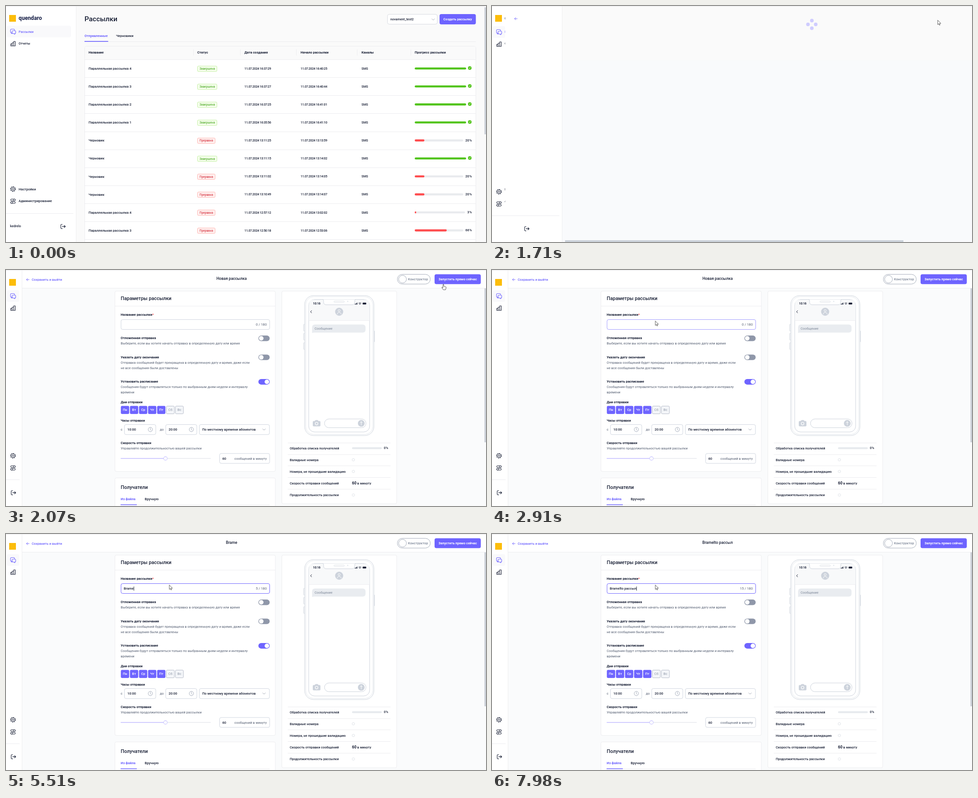
These frames come from a looping animation (1064 by 526 pixels, 8000 ms). An HTML page:

```html
<!DOCTYPE html>
<html lang="ru">
<head>
<meta charset="utf-8">
<style>
html, body { margin: 0; width: 100%; height: 100%; overflow: hidden; background: #fafafa; }
svg { display: block; font-family: Roboto, "Noto Sans", sans-serif; }
text { white-space: pre; }
.num { letter-spacing: -.33px; }
</style>
</head>
<body>
<svg id="stage" width="1064" height="526" viewBox="0 0 1064 526"></svg>
<script>
const INK = '#161d33', GRAY = '#525c70', PALE = '#cdd3dc', LINE = '#ececef', VIOLET = '#6e64ff';
const GREEN = '#52c41a', RED = '#ff4d4f';
const LOOP = 8000;

// Shape helpers; text is placed by its vertical centre.
const text = (x, y, s, { size = 7.5, w = 500, fill = INK, at = 'start', extra = '' } = {}) =>
  `<text x="${x}" y="${y + size * .36}" font-size="${size}" font-weight="${w}" fill="${fill}" text-anchor="${at}" ${extra}>${s}</text>`;
const rect = (x, y, x2, y2, fill, r = 0, stroke = 'none', extra = '') =>
  `<rect x="${x}" y="${y}" width="${x2 - x}" height="${y2 - y}" rx="${r}" fill="${fill}" stroke="${stroke}" ${extra}/>`;
const circle = (x, y, r, fill, stroke = 'none', extra = '') =>
  `<circle cx="${x}" cy="${y}" r="${r}" fill="${fill}" stroke="${stroke}" ${extra}/>`;
const path = (d, stroke, w = 1, fill = 'none', extra = '') =>
  `<path d="${d}" stroke="${stroke}" stroke-width="${w}" fill="${fill}" stroke-linecap="round" stroke-linejoin="round" ${extra}/>`;
const hline = (x, x2, y, color = LINE) => path(`M${x} ${y}H${x2}`, color);
const group = (id, body, extra = '') => `<g id="${id}" ${extra}>${body}</g>`;
const chevron = (x, y) => path(`M${x - 3} ${y - 1.5}l3 3 3-3`, '#9aa1ae', .9);
const backArrow = (x, y) => path(`M${x + 6} ${y}H${x}m2.8-2.8L${x} ${y}l2.8 2.8`, VIOLET, .9);
const bold = { w: 700, size: 7.4 };
const soft = { w: 400, size: 7.4, fill: GRAY };

// Mailing list page
const P = 'Параллельная рассылка ', D = 'Черновик';
const rows = [
  [P + 4, '16:37:29', '16:40:25', 100], [P + 3, '16:37:27', '16:40:44', 100],
  [P + 2, '16:37:25', '16:41:01', 100], [P + 1, '16:35:56', '16:41:10', 100],
  [D, '13:11:25', '13:13:59', 20], [D, '13:11:15', '13:14:02', 100],
  [D, '13:11:02', '13:14:05', 20], [D, '13:10:49', '13:14:07', 20],
  [P + 4, '12:57:12', '13:02:02', 3], [P + 3, '12:50:18', '12:53:06', 66]
];

function progress(y, pct) {
  if (pct === 100)
    return rect(906, y - 2.3, 1020, y + 2.3, GREEN, 2.3) + circle(1028, y - 1, 4, GREEN) +
      path(`M1026.3 ${y - 1}l1.2 1.3 2.1-2.5`, '#fff', .9);
  const end = pct < 10 ? 1017.5 : 1013.5;
  return rect(906, y - 2.3, end, y + 2.3, '#e9ebee', 2.3) +
    rect(906, y - 2.3, 906 + (end - 906) * pct / 100, y + 2.3, RED, 2.3) +
    text(1032.5, y - .5, pct + '%', { size: 7.6, at: 'end' });
}

function tableRow([name, made, start, pct], i) {
  const y = 139.2 + 40.1 * i, done = pct === 100;
  const [edge, bg, ink] = done ? ['#b7eb8f', '#f6ffed', '#389e0d'] : ['#ffa39e', '#fff1f0', '#cf1322'];
  const date = { size: 7, extra: 'class="num"' };
  return text(183, y, name, { size: 7.6 }) +
    rect(424.5, y - 5.3, done ? 467.5 : 463.5, y + 6.7, bg, 2, edge, 'stroke-width=".8"') +
    text(429, y + .5, done ? 'Завершена' : 'Прервана', { size: 6.5, fill: ink, w: 400 }) +
    text(528.5, y, '11.07.2024 ' + made, date) + text(653, y, '11.07.2024 ' + start, date) +
    text(788, y, 'SMS', { size: 7 }) + progress(y, pct) + hline(174, 1041, Math.round(y + 20) + .5);
}

const heads = [[183, 'Название'], [424, 'Статус'], [528.5, 'Дата создания'], [653, 'Начало рассылки'],
  [788, 'Каналы'], [906, 'Прогресс рассылки']];
const list = rect(155, 0, 1064, 526, '#fafafa') +
  text(174, 28.5, 'Рассылки', { size: 15.4 }) +
  rect(845.5, 18.5, 956, 40.5, '#fff', 4, '#d7dae0') + text(852, 29, 'novament_test2', { size: 7.2 }) + chevron(947, 30) +
  rect(961, 18, 1041.5, 41, VIOLET, 4, 'none', 'id="create"') +
  text(1001.3, 29, 'Создать рассылку', { size: 7.2, w: 700, fill: '#fff', at: 'middle' }) +
  text(174, 66.3, 'Отправленные', { size: 7.3, w: 700, fill: VIOLET }) + text(244, 66.3, 'Черновики', { size: 7.4 }) +
  hline(174, 1041, 79.5) + rect(174, 78, 226.5, 79.7, VIOLET) +
  rect(174.5, 89.5, 1041.5, 540, '#fff', 4, LINE) + rect(175, 90, 1041, 119, '#fafafa', 3) + hline(174, 1041, 119.5) +
  heads.map(([x, s]) => text(x, 103.3, s, bold)).join('') +
  [415, 519, 643, 778, 897].map(x => path(`M${x}.5 97V110`, LINE)).join('') +
  rows.map(tableRow).join('') + rect(1060.5, 3, 1064, 286, '#cbd0d7');

// Loading page
const load = rect(30, 0, 1064, 526, '#fafafa') + rect(155, 121, 1064, 526, '#f9fafc') +
  rect(162, 522, 912, 526, '#cbd2da') +
  group('spin', [0, 90, 180, 270].map(a => circle(0, -8.6, 4, '#cfccff', 'none', `transform="rotate(${a})"`)).join(''));

// Mailing form page
const toggle = (y, on) => rect(559.5, y - 6.2, 584.5, y + 6.2, on ? VIOLET : '#8f97a9', 6.2) +
  circle(on ? 578.3 : 565.8, y, 5, '#fff');
const box = (x, y, x2, y2, extra = '') => rect(x, y, x2, y2, '#fff', 3.5, '#cfd5df', extra);
const clock = x => circle(x, 355.5, 4.8, 'none', '#9aa3b3', 'stroke-width=".9"') + path(`M${x} 352.5v3l2 1.6`, '#9aa3b3', .9);
const day = (s, i) => {
  const x = 255 + i * 20.1, off = i > 4;
  return rect(x, 303.3, x + 17.6, 320.5, off ? '#f4f6f9' : VIOLET, 2, off ? '#a5adbb' : VIOLET, 'stroke-width=".8"') +
    text(x + 8.8, 311.5, s, { size: 7.6, w: off ? 400 : 500, fill: off ? '#8b94a5' : '#fff', at: 'middle' });
};
const labels = [[99, 'Название рассылки<tspan fill="#ff4d4f">*</tspan>'], [151.5, 'Отложенная отправка'],
  [194, 'Указать дату окончания'], [248.5, 'Установить расписание'], [294, 'Дни отправки'],
  [335, 'Часы отправки'], [385, 'Скорость отправки']];
const notes = [[163.7, 'Выберите, если вы хотите начать отправку в определенную дату или время'],
  [206, 'Отправка сообщений будет прекращена в определенную дату и время, даже если'],
  [218, 'не все сообщения были доставлены'],
  [260.5, 'Сообщения будут отправляться только по выбранным дням недели и интервалу'],
  [272.5, 'времени'], [397.5, 'Управляйте продолжительностью вашей рассылки']];
const params = rect(241.5, 47, 597, 449, '#fff', 3, LINE) + hline(242, 597, 80.5) +
  text(254.3, 63, 'Параметры рассылки', { size: 10.8 }) +
  labels.map(([y, s]) => text(254.3, y, s, bold)).join('') +
  notes.map(([y, s]) => text(254.3, y, s, soft)).join('') +
  box(255, 110.5, 584.5, 132.5, 'id="field"') + text(261, 121, '', { extra: 'id="typed"' }) +
  text(578, 121, '', { ...soft, size: 7.7, at: 'end', extra: 'id="count"' }) + rect(0, 117, .9, 126.3, INK, 0, 'none', 'id="caret"') +
  toggle(152.3, 0) + toggle(194.6, 0) + toggle(249.2, 1) +
  ['Пн', 'Вт', 'Ср', 'Чт', 'Пт', 'Сб', 'Вс'].map(day).join('') +
  text(254.3, 355, 'с', soft) + box(262.5, 344.5, 332, 366.8) + text(269, 355, '10:00') + clock(320) +
  text(341, 355, 'до', soft) + box(354, 344.5, 423, 366.8) + text(360.5, 355, '20:00') + clock(411) +
  box(428.5, 344.5, 584, 366.8) + text(435, 355, 'По местному времени абонентов') + chevron(572, 355.5) +
  rect(254, 419, 353, 421, '#d0ccff', 1) + rect(353, 419, 454, 421, '#eceef2', 1) + circle(353.5, 420, 4, '#fff', '#d0ccff', 'stroke-width="1.3"') +
  box(473.5, 409, 584.5, 431) + text(479.5, 420, '60') + text(578, 420, 'сообщений в минуту', { ...soft, at: 'end' });
const receivers = rect(241.5, 463.5, 597, 540, '#fff', 3, LINE) + text(254.3, 484, 'Получатели', { size: 10.8 }) +
  text(254.3, 510.5, 'Из файла', { ...bold, fill: VIOLET }) + text(307.5, 510.5, 'Вручную') +
  hline(254, 584, 523.5) + rect(254, 522.5, 290, 524, VIOLET);

const phone = [[121, 136], [141, 156], [162, 177]].map(([a, b]) => rect(660, a, 663, b, '#fff', 1, PALE)).join('') +
  rect(814, 136, 817, 160, '#fff', 1, PALE) +
  rect(662, 57, 815.5, 369, '#fff', 20, PALE) + rect(664.5, 59.5, 813, 366.5, '#fff', 18, '#e2e6eb') +
  rect(671, 65.5, 806, 361, '#fff', 13, PALE) +
  path('M671.5 112.5V78q0-12 12-12H794q11.500 0 11.500 12v34.500z', 'none', 0, '#f8f9fa') + hline(671, 806, 112.5) +
  path('M702 65.500q2 0 2 3v3q0 6 6 6h57q6 0 6-6v-3q0-3 2-3', PALE, 1, '#fff') +
  rect(727, 69, 750, 72, '#fff', 1.5, '#dde1e7') + circle(757.5, 70, 1.4, '#e4e8ed') +
  text(680.5, 74.2, '10:16', { size: 6.4, w: 700 }) +
  [0, 1, 2, 3].map(i => rect(773 + i * 1.6, 75.7 - i, 774.1 + i * 1.6, 77, INK)).join('') +
  path('M781.800 73.800q2.700-2 5.400 0M783 75.500q1.500-1 3 0', INK, .9) + circle(784.5, 76.7, .6, INK) +
  rect(790.5, 72.7, 798.5, 76.7, INK, 1.3) +
  path('M677.500 90.500l-2.500 2.600 2.500 2.600', INK, 1) +
  circle(738.5, 93, 9, PALE) + circle(738.5, 90.5, 2.3, 'none', '#fff') + path('M734 98.500q.5-4 4.500-4t4.500 4', '#fff') +
  path('M678.500 140.500V128q0-6.500 6.500-6.500h105.500q6.500 0 6.500 6.500v5q0 6.500-6.500 6.500H682z', 'none', 0, '#e9ecf0') +
  text(684, 130.3, 'Сообщение', { ...soft, fill: '#7d8798' }) +
  rect(680, 336.5, 697, 348.5, PALE, 2.5) + rect(685, 334.5, 692, 339, PALE, 1.5) + circle(688.5, 342.3, 3, PALE, '#fff', 'stroke-width="1.2"') +
  rect(706, 332, 798, 351.5, '#fff', 9.8, PALE) + circle(787.5, 341.8, 7.5, PALE) +
  path('M787.500 345.500v-7.500m-2.500 2.500l2.500-2.500 2.500 2.500', '#fff');
const stats = ['Обработка списка получателей', 'Валидные номера', 'Номера, не прошедшие валидацию',
  'Скорость отправки сообщений', 'Продолжительность рассылки'].map((s, i) =>
  hline(625, 852, Math.round(384.7 + 25.8 * i) + .5) + text(629, 397 + 26 * i, s, { size: 7.4 })).join('') +
  rect(767, 395, 833, 399.3, '#e7eaee', 2.1) + text(837.5, 396.7, '0%', { size: 7.4 }) +
  [423, 449, 501.5].map(y => circle(770, y, 2.8, 'none', '#dfe3e8')).join('') +
  text(767, 475, '<tspan font-size="8.5" font-weight="700">60</tspan> в минуту', { size: 7.4 });
const form = rect(30, 0, 1064, 526, '#fafbfc') + rect(30, 0, 1064, 40.5, '#fff') + hline(36, 1064, 40.5) +
  backArrow(45.3, 21.4) + text(57, 21, 'Сохранить и выйти', { size: 7.4, fill: VIOLET }) +
  text(500, 19, '', { size: 8.6, at: 'middle', extra: 'id="title"' }) +
  rect(867.5, 9.7, 940.5, 31.3, '#fff', 10.8, '#a3abb9') + circle(879, 20.5, 8.6, '#fff', '#a3abb9') +
  text(891, 20.3, 'Конструктор', { size: 7.4, fill: '#7b8597' }) +
  rect(950, 9.5, 1052.5, 31.5, VIOLET, 4) + text(1001.3, 20, 'Запустить прямо сейчас', { size: 7.3, w: 700, fill: '#fff', at: 'middle' }) +
  params + receivers + rect(611.5, 47, 866, 521, '#fff', 3, LINE) + phone + stats + rect(1060.5, 41, 1064, 384, '#cbd0d7');

// Sidebar
const chat = path('M12 59.500q-2 0-2-2v-4q0-2 2-2h5q2 0 2 2v1.500M12 59.500v2.200l2-2M15.500 55h4q2 0 2 2v2.500q0 2-2 2v1.700l-2-1.700h-2q-2 0-2-2V57q0-2 2-2z', VIOLET, 1.1);
const chart = path('M10.500 89v-4.500h3V89zM13.500 89v-7h3.500v7zM17 89V79h3.500v10z', INK, 1.1);
const gear = circle(15.5, 408, 4.3, 'none', INK) + circle(15.5, 408, 1.7, 'none', INK) +
  circle(15.5, 408, 5.3, 'none', INK, 'stroke-width="1.4" stroke-dasharray="2 2.16"');
const sliders = rect(10.2, 430.3, 20.8, 434, 'none', 1.9, INK) + rect(10.2, 436.3, 20.8, 440, 'none', 1.9, INK) +
  circle(18.7, 432.2, 2.1, '#fff', INK) + circle(12.3, 438.1, 2.1, '#fff', INK);
const side = rect(0, 0, 155, 526, '#fff', 0, 'none', 'id="panel"') + path('M0 0V526', '#eeeef0', 1, 'none', 'id="edge"') +
  rect(7, 20, 22, 35, '#fcbd0b') +
  group('upper', rect(2, 44, 144, 70, '#f9f9fb', 4, 'none', 'id="chosen"') + chat + chart) +
  group('lower', gear + sliders) + path('M0 462.500H1', LINE, 1, 'none', 'id="rule"') +
  group('names', text(28, 26.5, 'quendaro', { size: 12.2, w: 700, fill: '#141c44' }) +
    text(28, 57, 'Рассылки', { size: 7, fill: VIOLET }) + text(28, 83.5, 'Отчеты', { size: 7.2 }) +
    text(28, 408, 'Настройки') + text(28, 434.7, 'Администрирование'), 'clip-path="url(#crop)"') +
  text(9, 490.3, 'kedrelo', { size: 7.3, extra: 'id="user"' }) +
  group('exit', path('M-1.500-4.700H-3.200q-1.600 0-1.600 1.600v6.200q0 1.600 1.600 1.600h1.700M-1.500 0H5.300M2.700-2.600L5.300 0 2.700 2.600', INK, 1.1)) +
  group('back', backArrow(50, 28.3));

const pointer = path('M0 0V9.500l2.200-2 1.500 3.300 1.500-.7-1.500-3.200h3z', '#333', .8, '#fff', 'id="arrow"') +
  path('M.3 0q1 0 1 1v3.300l4 .9q1.200.3 1 1.600l-.6 3-.7 2.200H.2L-3 7.700q-.8-1.500.5-1.500l1.800 1.400V1q0-1 1-1z', '#333', .8, '#fff', 'id="hand"');

stage.innerHTML = '<clipPath id="crop"><rect id="cut" x="28" y="0" height="526"/></clipPath>' +
  group('formPage', form) + group('loadPage', load) + group('listPage', list) + group('sidebar', side) +
  hline(0, 1064, .5, '#e9e9eb') + circle(0, 0, 7, '#ffd23c', 'none', 'id="halo" opacity=".6"') + group('cursor', pointer);

const el = Object.fromEntries([...stage.querySelectorAll('[id]')].map(n => [n.id, n]));
const ramp = (t, a, b) => Math.min(1, Math.max(0, (t - a) / (b - a)));
const mix = (a, b, p) => a + (b - a) * p;
const smooth = p => p * p * (3 - 2 * p);
const within = (t, a, b) => t >= a && t < b;
const set = (n, attrs) => { for (const k in attrs) el[n].setAttribute(k, attrs[k]); };
const show = (n, on) => set(n, { visibility: on ? 'visible' : 'hidden' });
const move = (n, x, y) => set(n, { transform: `translate(${x} ${y})` });

const route = [[40, 194, 298], [180, 1024, 50], [560, 1008, -10], [960, 988, 32], [1850, 988, 32],
  [2070, 970, 32], [2290, 806, 52], [2600, 520, 98], [2910, 362, 114]];
const phrase = 'Bramelto рассыл';
const keys = [4730, 4910, 5150, 5250, 5510, 5790, 6020, 6350, 6680, 7050, 7230, 7430, 7610, 7740, 7980];

function place(t) {
  const i = route.findIndex(k => k[0] > t);
  if (i < 1) return (i ? route.at(-1) : route[0]).slice(1);
  const [a, b] = [route[i - 1], route[i]], p = ramp(t, a[0], b[0]);
  return [mix(a[1], b[1], p), mix(a[2], b[2], p)];
}

function drawSidebar(t) {
  const mini = t >= 1570, fold = smooth(ramp(t, 1710, 1910)), width = mix(155.5, 35.5, fold);
  set('panel', { width });
  move('edge', width, 0);
  set('cut', { width: mix(80, 1.2, ramp(t, 1540, 1710)) });
  move('upper', 0, mini ? 1 : 0);
  move('lower', 0, mini ? 6 : 0);
  set('chosen', { width: mix(142, 27, ramp(t, 1540, 1710)) });
  set('rule', { d: `M0 ${mini ? 467.5 : 462.5}H${mix(149, 30, fold)}` });
  show('names', t < 1880);
  show('user', !mini);
  move('exit', mini ? mix(77, 16.3, fold) : 126.3, mini ? 496.4 : 491.4);
  show('back', within(t, 1620, 1960));
}

function drawField(t) {
  const n = keys.filter(k => k <= t).length;
  el.typed.textContent = phrase.slice(0, n);
  el.title.textContent = phrase.slice(0, n).trim() || 'Новая рассылка';
  el.count.textContent = n + ' / 180';
  set('field', { stroke: t >= 3060 ? VIOLET : t >= 2650 ? '#a19bff' : '#cfd5df' });
  set('caret', { x: 261.2 + (n ? el.typed.getComputedTextLength() : 0) });
  show('caret', within(t, 3060, 3710) || t >= 4630);
}

function draw(t) {
  const [x, y] = place(t), click = within(t, 1230, 1380) || within(t, 3060, 3240);
  const hand = within(t, 700, 1600) || within(t, 1960, 2130);
  const hover = ramp(t, 720, 920);
  set('create', { fill: `rgb(${mix(110, 146, hover)},${mix(100, 140, hover)},255)` });
  set('listPage', { opacity: 1 - ramp(t, 1520, 1660) });
  set('loadPage', { opacity: 1 - ramp(t, 1920, 2020) });
  set('spin', { transform: `translate(${mix(709, 550, smooth(ramp(t, 1710, 1910)))} 41) rotate(${(t - 1710) * .3})` });
  drawSidebar(t);
  drawField(t);
  move('cursor', x, y);
  show('cursor', within(t, 40, 220) || t >= 560);
  show('arrow', false);
  show('hand', false);
  el[hand ? 'hand' : 'arrow'].removeAttribute('visibility');
  move('halo', x, y + 2);
  show('halo', click);
}

const born = performance.now();
function tick() {
  draw((performance.now() - born) % LOOP);
  requestAnimationFrame(tick);
}
tick();
</script>
</body>
</html>
```
